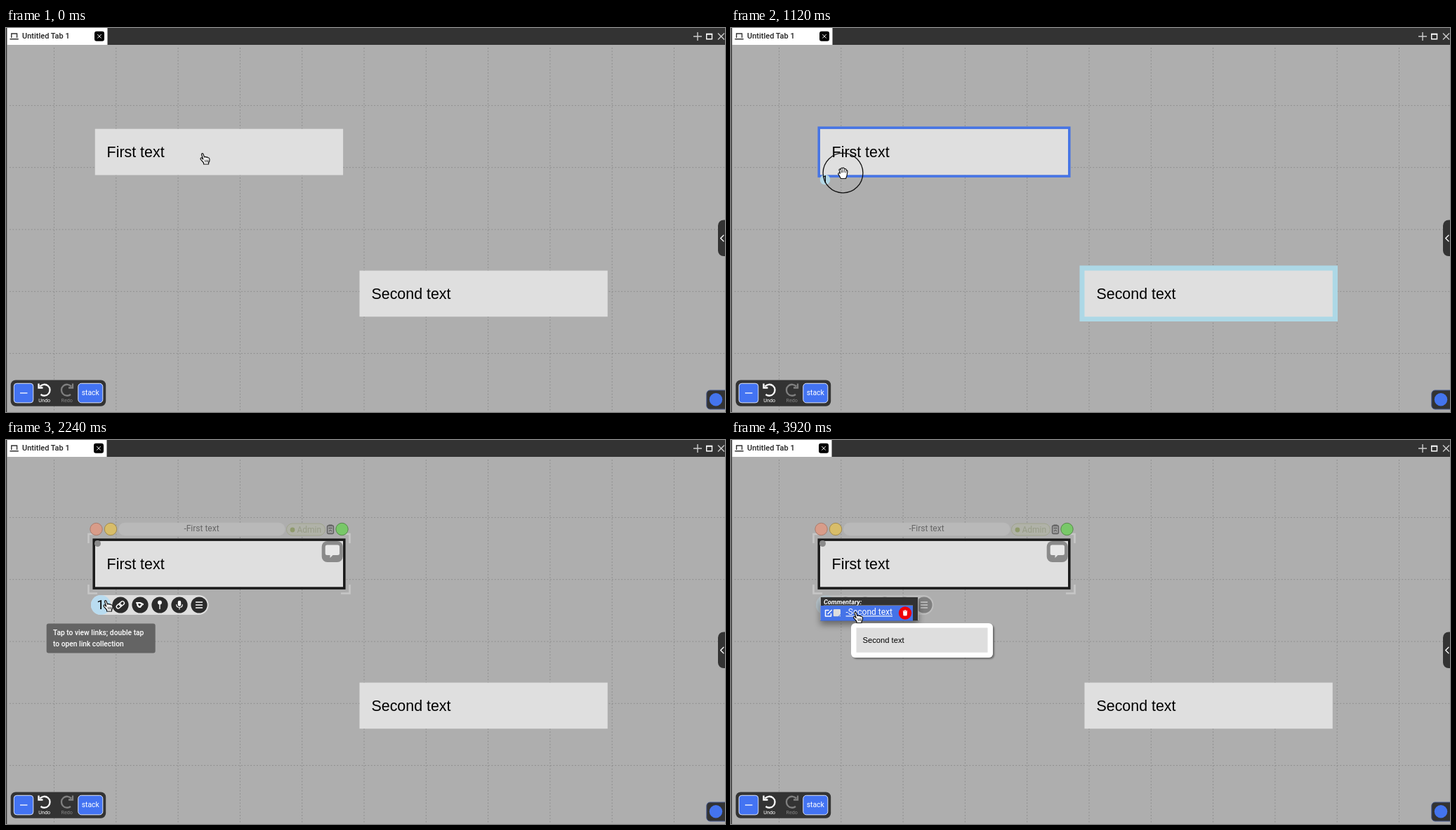
Animation, 1024 px wide and 547 px high, one loop 5.25 s. Source, as an HTML page:

```html
<!DOCTYPE html>
<html lang="en">
<head>
<meta charset="utf-8">
<title>Linked notes</title>
<style>
  html, body { margin: 0; width: 100%; height: 100%; overflow: hidden; background: #aeaeae; }
  svg { display: block; width: 100%; height: 100%; font-family: Roboto, sans-serif; }
  .note { font-family: "Liberation Sans", Arial, sans-serif; }
  .mid { text-anchor: middle; }
  .line { fill: none; stroke: #fff; stroke-linecap: round; stroke-linejoin: round; }
  .hand { fill: #fff; stroke: #111; stroke-width: 1.2; stroke-linejoin: round; stroke-linecap: round; }
</style>
</head>
<body>
<svg viewBox="0 0 1024 547" preserveAspectRatio="none">
  <defs>
    <filter id="soft" x="-20%" y="-40%" width="140%" height="220%">
      <feDropShadow dx="0" dy="6" stdDeviation="5" flood-opacity=".4"/>
    </filter>
    <filter id="near"><feDropShadow dx="2" dy="2" stdDeviation="1" flood-opacity=".4"/></filter>
    <path id="turn" d="M-6.5 -5 A8 8 0 1 1 -5.5 6.5 M-8.5 -9 V-3 H-2.5"/>
  </defs>

  <rect width="1024" height="547" fill="#aeaeae"/>
  <path id="grid" fill="none" stroke="#8c8c8c" stroke-dasharray="1.8 2.6"/>
  <path d="M0 0 H1024 V24 H1.3 V547 H0 Z" fill="#333"/>

  <!-- Tab strip -->
  <rect id="tab" x="1.5" width="143" height="24" fill="#fff"/>
  <path d="M7.8 14 V8 H15.6 V14 M5.5 15.8 H17.8" fill="none" stroke="#333" stroke-width="1.4"/>
  <text x="23" y="15.4" font-size="11" font-weight="500" fill="#222">Untitled Tab 1</text>
  <g id="close">
    <rect x="126" y="4.8" width="14" height="14" rx="3" fill="#000"/>
    <path d="M130.5 9.3 l5 5 m0 -5 l-5 5" class="line"/>
  </g>
  <g fill="none" stroke="#ccc" stroke-width="1.4">
    <path d="M979 12 H991 M985 6 V18 M1014 7.5 l9 9 m0 -9 l-9 9"/>
    <path d="M997.7 8.5 V15.8 H1005.5 V8.5" stroke="#fff"/>
    <path d="M997 8.7 H1006.2" stroke="#fff" stroke-width="2"/>
  </g>

  <!-- Notes -->
  <rect id="halo" x="496.5" y="338.4" width="367.5" height="79.6" fill="#add8e6"/>
  <g class="note" font-size="21.4">
    <rect x="126.8" y="143.7" width="353.3" height="65.8" fill="#dfdfdf"/>
    <text x="143.6" y="183.8">First text</text>
    <rect x="503.5" y="345.6" width="353.3" height="65.6" fill="#dfdfdf"/>
    <text x="520.5" y="385.5">Second text</text>
  </g>
  <rect id="edge" x="125.2" y="142.1" width="356.6" height="69" fill="none" stroke-width="3.5"/>
  <g id="badge">
    <circle cx="134" cy="216" r="7.3" fill="#b3d8e6"/>
    <text x="134" y="221" font-size="14" class="mid">1</text>
  </g>

  <!-- Controls around the selected note -->
  <g id="frame">
    <path d="M117.5 147 V134 H130 M477 134 H489.5 V147 M489.5 206 V218.5 H477 M130 218.5 H117.5 V206"
      fill="none" stroke="#c6c6c6" stroke-width="2.6"/>
    <circle cx="128.5" cy="127" r="8.7" fill="#d89c89" stroke="#a97b6d"/>
    <circle cx="149" cy="127" r="8.7" fill="#d8bd69" stroke="#a08a50"/>
    <rect x="160" y="117.8" width="237.5" height="18.4" rx="9" fill="#b9b9b9"/>
    <text x="278.5" y="130.3" font-size="12" fill="#666" class="mid">-First text</text>
    <rect x="399.5" y="119" width="55" height="17" rx="8.5" fill="#b0b2a8" stroke="#a0a48e"/>
    <circle cx="408" cy="128" r="3.4" fill="#8f9a6c"/>
    <text x="414.5" y="132.2" font-size="12" fill="#989d88">Admin</text>
    <rect x="457.5" y="122" width="9" height="11.5" rx="1.5" fill="#999" stroke="#5c5c5c" stroke-width="1.3"/>
    <path d="M459.5 121 h5 M459.5 125.5 h5 M460 130 l2 -2 2 2" fill="none" stroke="#555"/>
    <circle cx="478.5" cy="127" r="8.7" fill="#78c868" stroke="#56874c"/>
    <circle cx="130.5" cy="147.5" r="4.5" fill="#8b8b8b"/>
    <rect x="449.7" y="144" width="30" height="30" rx="8" fill="#8a8a8a"/>
    <path d="M457 149.5 H472.5 Q475 149.5 475 152 V161.5 Q475 164 472.5 164 H465.5 L461.5 168 V164 H457
      Q454.7 164 454.7 161.5 V152 Q454.7 149.5 457 149.5 Z" fill="#e8e8e8"/>
    <g id="bar">
      <rect x="121" y="221" width="167.5" height="28" rx="14" fill="#dedede"/>
      <path d="M149 235 A14 14 0 1 1 135 221 A14 14 0 0 1 149 235" fill="#b9dcf0"/>
      <text x="134.5" y="241.3" font-size="19" class="mid">1</text>
      <g id="discs" fill="#2b2b2b"></g>
      <g class="line" stroke-width="1.4">
        <g transform="rotate(-40 163 235)">
          <rect x="156.5" y="232.3" width="7.5" height="5" rx="2.5"/>
          <rect x="162" y="232.3" width="7.5" height="5" rx="2.5"/>
        </g>
        <path d="M186 232 h5 l4 2 M187 232 q0 6 4 6 l3 -4" stroke-width="2.2"/>
        <path d="M219 233 V240.5"/>
        <circle cx="219" cy="231.5" r="2.2" fill="#fff"/>
        <rect x="245.5" y="229.5" width="3" height="6.5" rx="1.5" fill="#fff"/>
        <path d="M242.8 234.5 q0 4 4.2 4 t4.2 -4 M247 238.5 V241" stroke-width="1.2"/>
        <path d="M270.5 231 h9 m-9 4 h9 m-9 4 h9"/>
      </g>
    </g>
  </g>

  <g id="tip" font-size="10.25" font-weight="500" fill="#fff">
    <rect x="57.7" y="261.5" width="155" height="42" rx="3" fill="#646464"/>
    <text x="67" y="278.2">Tap to view links; double tap</text>
    <text x="67" y="293.8">to open link collection</text>
  </g>

  <!-- Link list -->
  <g id="menu">
    <rect x="127" y="224" width="140" height="33.3" fill="#333" filter="url(#soft)"/>
    <path d="M127.4 224 V257 M266.6 224 V257" stroke="#ddd" stroke-width=".8"/>
    <text x="132" y="233.6" font-size="9.2" font-weight="700" font-style="italic" fill="#fff">Commentary:</text>
    <path d="M132 236 H259" stroke="#aaa"/>
    <rect id="row" x="127.5" y="236" width="131.5" height="21.6" fill="#4573e8"/>
    <path d="M147.2 241 H154.6 Q156 241 156 242.4 V248 L152.8 251.3 H147.2 Q145.8 251.3 145.8 250 V242.4
      Q145.8 241 147.2 241 Z M156 251.3 L154 251.3 156 249.3 Z" fill="#ddd"/>
    <text id="link" x="163.5" y="249.3" font-size="12" fill="#fff">-Second text</text>
    <g id="tools">
      <path d="M139 242.5 H134.5 V251 H142.5 V247.5 M138 247.8 L143.3 242.3" class="line" stroke-width="1.5"/>
      <circle cx="248" cy="246.5" r="9.2" fill="#ee0008"/>
      <path d="M245.4 244.6 h5.2 l-.5 5.4 h-4.2 z M244.8 243.4 h6.4 M247 242.5 h2" fill="#fff" stroke="#fff" stroke-width=".8"/>
    </g>
  </g>
  <g id="preview">
    <rect x="171" y="261" width="202" height="49" rx="6" fill="#fff" filter="url(#near)"/>
    <rect x="178.5" y="267.5" width="187" height="35.2" fill="#dedede"/>
    <text x="187.5" y="289" font-size="11.2" class="note">Second text</text>
  </g>

  <!-- Fixed tools -->
  <rect x="6.7" y="501.5" width="135.5" height="37.3" rx="7" fill="#333"/>
  <g fill="#4373f2" stroke="#dfe6fa">
    <rect x="11.3" y="506.3" width="27.5" height="27.5" rx="4"/>
    <rect x="102.8" y="506.3" width="35" height="27.5" rx="4.5"/>
  </g>
  <path d="M20 520 H30.5" stroke="#fff" stroke-width="1.3"/>
  <g fill="none" stroke-width="2.3">
    <use href="#turn" x="55" y="515.5" stroke="#fff"/>
    <use href="#turn" transform="translate(86.5 515.5) scale(-1 1)" stroke="#808080"/>
  </g>
  <g class="mid" fill="#fff">
    <text x="54.7" y="532.5" font-size="7.2">Undo</text>
    <text x="86.7" y="532.5" font-size="7.2" fill="#858585">Redo</text>
    <text x="120.2" y="523" font-size="10.4">stack</text>
  </g>
  <rect x="1014" y="273.5" width="30" height="51.5" rx="8" fill="#333"/>
  <path d="M1022 295.3 l-4.3 4.2 4.3 4.2" class="line" stroke-width="1.3"/>
  <rect x="997.8" y="516" width="34" height="27" rx="5" fill="#333" stroke="#465a92"/>
  <circle cx="1011" cy="529.3" r="9.2" fill="#4474ee"/>

  <!-- Mouse: the hot spot is at 0,0 -->
  <g id="mouse">
    <circle id="press" r="28.4" fill="none" stroke="#111" stroke-width="1.3"/>
    <g id="point" class="hand" transform="translate(3 8)">
      <path d="M-2 8 V6 L-6.4 .8 Q-6.6 -1.5 -4.6 -1 L-2.8 1 L-5 -6 Q-4.6 -8 -2.9 -7 L-1 -2 Q.5 -3.3 1.6 -1.8
        Q3 -2.7 4 -1.2 Q6 -1.6 6.4 1 Q6.8 4 5 6 V8 Z"/>
      <path d="M-.2 2 l.6 3 M2 2 l.3 3 M4 2 v3" stroke-width=".8"/>
    </g>
    <g id="grab" class="hand">
      <path d="M-3 8 L-6.8 1.4 Q-6.5 -1 -4 .5 L-5.5 -4.5 Q-4.7 -6.5 -3.1 -5 Q-2.8 -8 -.6 -7 Q1.4 -8 2.2 -5.8
        Q4.2 -6.6 4.7 -4 Q6.8 -4.2 6.3 -1 L5.5 4 L4 8 Z"/>
      <path d="M-3.1 -5 L-2 -.8 M-.5 -6 V-1 M2.2 -5.5 L1.7 -1 M4.7 -4 L3.8 -.5" stroke-width=".8"/>
    </g>
    <g id="beam" fill="none" stroke-linecap="round">
      <path d="M-3.5 -7 Q0 -6.5 0 -4 V5 Q0 7.5 -3.5 8 M3.5 -7 Q0 -6.5 0 -4 M0 5 Q0 7.5 3.5 8 M-2 2.5 H2" stroke="#fff" stroke-width="3"/>
      <path d="M-3.5 -7 Q0 -6.5 0 -4 V5 Q0 7.5 -3.5 8 M3.5 -7 Q0 -6.5 0 -4 M0 5 Q0 7.5 3.5 8 M-2 2.5 H2" stroke="#111" stroke-width="1.2"/>
    </g>
  </g>
</svg>
<script>
const LOOP = 5250, STEP = 70, CELL = 88.3;
const el = id => document.getElementById(id);

// time, x, y of the mouse hot spot
const path = [
  [210, 280.5, 178], [350, 250.5, 178.5], [770, 190, 194], [1120, 159.5, 206.5], [1330, 142, 213],
  [1540, 142, 213], [1890, 144.5, 220.5], [2240, 142.5, 228], [3010, 142.5, 228],
  [3220, 150, 238], [3500, 171, 243], [3920, 178, 244.5]
];

// value at t of a list of [time, value...] keys
function track(keys, t, i = 1) {
  const next = keys.findIndex(k => k[0] > t);
  if (next < 0) return keys[keys.length - 1][i];
  if (next === 0) return keys[0][i];
  const a = keys[next - 1], b = keys[next];
  return a[i] + (b[i] - a[i]) * (t - a[0]) / (b[0] - a[0]);
}

const show = (id, on) => el(id).style.opacity = +on;

function draw(t) {
  const within = (a, b) => t >= a && t < b;
  const linked = within(280, 1610), picked = t >= 1610, hover = t >= 3290;

  el("mouse").setAttribute("transform", `translate(${track(path, t, 1)} ${track(path, t, 2)})`);
  const beam = within(3010, 3220);
  show("grab", linked);
  show("beam", beam);
  show("point", !linked && !beam);
  show("press", within(1120, 1330) || within(2520, 2660));

  show("halo", linked);
  show("badge", linked);
  show("edge", linked || picked);
  el("edge").setAttribute("stroke", picked ? "#1a1a1a" : "#4574e6");
  el("tab").setAttribute("width", picked ? 142 : 143);
  el("close").setAttribute("transform", `translate(${picked ? -1 : 0} 0)`);

  show("frame", picked);
  show("bar", track([[2030, .35], [2240, 1], [3150, 1], [3290, .35]], t));
  show("tip", t < 3010 ? track([[2100, 0], [2240, 1]], t) : 0);
  show("menu", t >= 3010);
  show("row", hover);
  show("tools", hover);
  el("link").setAttribute("text-decoration", hover ? "underline" : "none");
  show("preview", t >= 3430);
}

let grid = "";
for (let x = 68.5; x < 1024; x += CELL) grid += `M${x} 28V547`;
for (let y = 110.4; y < 547; y += CELL) grid += `M5 ${y}H1024`;
el("grid").setAttribute("d", grid);
el("discs").innerHTML = [0, 1, 2, 3, 4].map(i => `<circle cx="${163 + 28 * i}" cy="235" r="11.6"/>`).join("");

const start = performance.now();
function tick() {
  const t = (performance.now() - start) % LOOP;
  draw(Math.floor(t / STEP) * STEP);
  requestAnimationFrame(tick);
}
tick();
</script>
</body>
</html>
```
